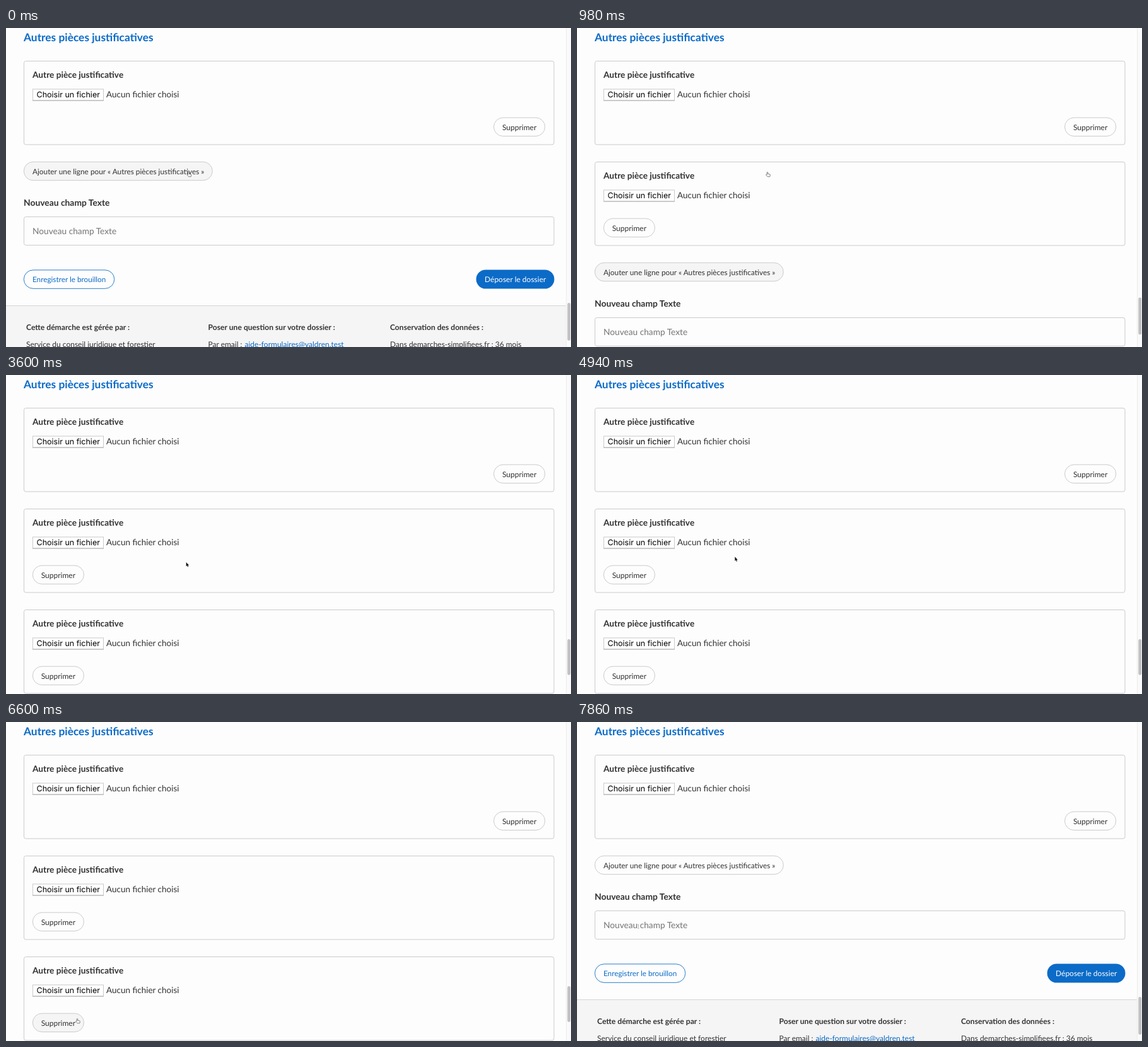
An HTML page that plays this animation: 896 px wide and 506 px high, repeating every 8000 ms.

```html
<!DOCTYPE html>
<html lang="fr">
<head>
<meta charset="utf-8">
<title>Pièces justificatives</title>
<style>
  html, body { margin: 0; width: 100%; height: 100%; overflow: hidden; background: #fdfdfd; }
  svg { display: block; width: 896px; height: 506px; }
  text { font-family: Lato, sans-serif; fill: #333; text-rendering: geometricPrecision; white-space: pre; }
  .b { font-weight: 700; }
  .blue { fill: #0b6bc7; }
  .hint { fill: #757575; }
  .native { font-family: Inter, "Liberation Sans", sans-serif; fill: #000; }
  .box { fill: #fdfdfd; stroke: #cbcbcb; }
  .box.hover { fill: #f5f5f5; }
  .outline { fill: #fdfdfd; stroke: #2a7ecd; }
</style>
</head>
<body>
<svg id="stage" viewBox="0 0 896 506" xmlns="http://www.w3.org/2000/svg"></svg>
<script>
const LOOP = 8000;
const ROW = 160;

const text = (x, y, size, str, cls = '') =>
  `<text x="${x}" y="${y}" font-size="${size}" class="${cls}">${str}</text>`;
const rect = (x, y, w, h, r, cls, id = '') =>
  `<rect x="${x}" y="${y}" width="${w}" height="${h}" rx="${r}" class="${cls}" id="${id}"/>`;

function card(i) {
  const px = i ? 42.3 : 773.5;
  return `<g id="card${i}" transform="translate(0 ${i * ROW})">` +
    rect(28.5, 52.5, 840.5, 132.5, 3, 'box') +
    text(42, 78.6, 13.7, 'Autre pièce justificative', 'b') +
    '<rect x="42.5" y="97" width="112" height="18" fill="#fff" stroke="#cacaca"/>' +
    '<path d="M42 115H155" stroke="#b0b0b0"/>' +
    text(48.5, 110.2, 12.5, 'Choisir un fichier', 'native') +
    text(159, 110.2, 13.5, 'Aucun fichier choisi') +
    rect(px, 142.2, 81.2, 29.4, 14.7, 'box', 'del' + i) +
    text(px + 13.4, 161.5, 12, 'Supprimer') + '</g>';
}

const lower =
  rect(28.3, 212.3, 299, 29.4, 14.7, 'box', 'add') +
  text(42, 231.6, 11.85, 'Ajouter une ligne pour « Autres pièces justificatives »') +
  text(28, 282.2, 13.85, 'Nouveau champ Texte', 'b') +
  rect(28.5, 299.5, 840.5, 45, 3, 'box') +
  text(42, 326.6, 13.7, 'Nouveau champ Texte', 'hint') +
  rect(28.3, 383.9, 143.5, 29.4, 14.7, 'outline') +
  text(42, 403.2, 11.75, 'Enregistrer le brouillon', 'blue') +
  '<rect x="745.6" y="383.4" width="123.9" height="30.2" rx="15.1" fill="#0b6bc7"/>' +
  '<text x="759" y="403.2" font-size="12" style="fill:#fff">Déposer le dossier</text>' +
  '<rect y="440" width="889" height="240" fill="#f5f5f5"/>' +
  '<path d="M0 440.5H889" stroke="#b4b4b4" stroke-dasharray="1 1"/>' +
  text(32, 478.7, 12.15, 'Cette démarche est gérée par :', 'b') +
  text(320.5, 478.7, 12.15, 'Poser une question sur votre dossier :', 'b') +
  text(609, 478.7, 12.1, 'Conservation des données :', 'b') +
  text(32, 505.6, 12, 'Service du conseil juridique et forestier') +
  text(320.5, 505.6, 12, 'Par email :') +
  '<g text-decoration="underline">' +
  text(378.5, 505.6, 12, 'aide-formulaires@valdren.test', 'blue') + '</g>' +
  text(609, 505.6, 12, 'Dans demarches-simplifiees.fr : 36 mois');

const pointers =
  '<path id="arrow" d="M0 0V6.6L1.5 5.3L2.5 7.6L3.6 7.1L2.6 4.9H4.5Z" fill="#111" stroke="#fff" stroke-width=".7" paint-order="stroke"/>' +
  '<path id="hand" d="M2.2 5.9V2.4a.8.8 0 0 1 1.6 0V4.5L6.5 5c.8.1 1 .6.9 1.2L6.8 8.8H3.2L.8 6.4c-.4-.6.3-1.2.9-.8z" fill="#fff" stroke="#666" stroke-width=".85"/>' +
  '<path id="beam" d="M-1 -3Q0 -3 0 -2.2V2.8Q0 3.6 -1 3.6M1 -3Q0 -3 0 -2.2M0 2.8Q0 3.6 1 3.6" fill="none" stroke="#999" stroke-width=".7"/>';

document.getElementById('stage').innerHTML =
  '<rect width="896" height="506" fill="#fdfdfd"/>' +
  text(28, 20.6, 17.35, 'Autres pièces justificatives', 'b blue') +
  `<g id="lower">${lower}</g>` + card(0) + card(1) + card(2) +
  '<rect x="888" width="8" height="506" fill="#fafafa"/>' +
  '<path d="M888.5 0V506" stroke="#ececec"/>' +
  '<rect id="thumb" x="890.3" width="4.8" rx="2.4" fill="#c1c1c1"/>' + pointers;

const $ = id => document.getElementById(id);
const show = (id, on) => $(id).setAttribute('visibility', on ? 'visible' : 'hidden');
const hover = (id, on) => $(id).classList.toggle('hover', on);

// time, number of cards
const pages = [[0, 1], [980, 2], [3170, 3], [6750, 2], [7510, 1]];
// scrollbar thumb per card count: top, height
const thumbs = { 1: [436, 60], 2: [427.5, 59], 3: [419, 57] };

// time, pointer, x, y; the pointer jumps and rests
const moves = [
  [0, 'hand', 286.5, 227], [100, 'hand', 293, 227], [150, 'hand', 299, 227],
  [2000, ''], [2160, 'arrow', 286.5, 336.3], [2310, 'arrow', 288, 360],
  [2440, 'hand', 287, 393], [2750, 'hand', 287, 388], [3010, 'hand', 286.5, 387],
  [3170, 'arrow', 287, 328.3], [3310, 'arrow', 287.5, 311], [3440, 'arrow', 286, 299],
  [3600, 'arrow', 285.7, 297], [4940, 'arrow', 250.4, 288.3],
  [5090, 'arrow', 214, 288.3], [5220, 'arrow', 185.4, 288.5],
  [5400, 'arrow', 184.4, 291], [5530, 'arrow', 183.5, 302],
  [5690, 'arrow', 127.6, 406.8], [5840, 'arrow', 121.6, 435],
  [5990, 'arrow', 121.4, 436], [6190, 'arrow', 121.4, 437],
  [6340, 'arrow', 119, 450], [6470, 'hand', 111, 466], [6600, 'hand', 110, 469],
  [6910, 'beam', 114, 471], [7120, 'arrow', 108, 446], [7250, 'arrow', 100, 356],
  [7380, 'arrow', 97.6, 337.6], [7510, 'hand', 94, 324], [7860, 'beam', 97.4, 324]
];

const at = (list, t) => list.reduce((cur, k) => (k[0] <= t ? k : cur));

function draw(t) {
  const cards = at(pages, t)[1];
  show('card1', cards > 1);
  show('card2', cards > 2);
  $('lower').setAttribute('transform', `translate(0 ${(cards - 1) * ROW})`);
  const [top, height] = thumbs[cards];
  $('thumb').setAttribute('y', top);
  $('thumb').setAttribute('height', height);
  hover('add', t < 3170);
  hover('del2', t >= 6470 && t < 6750);

  const [, kind, x, y] = at(moves, t);
  for (const id of ['arrow', 'hand', 'beam']) show(id, id === kind);
  if (kind) $(kind).setAttribute('transform', `translate(${x} ${y})`);
}

const start = performance.now();
function tick(now) {
  draw(Math.max(0, now - start) % LOOP);
  requestAnimationFrame(tick);
}
draw(0);
requestAnimationFrame(tick);
</script>
</body>
</html>
```
